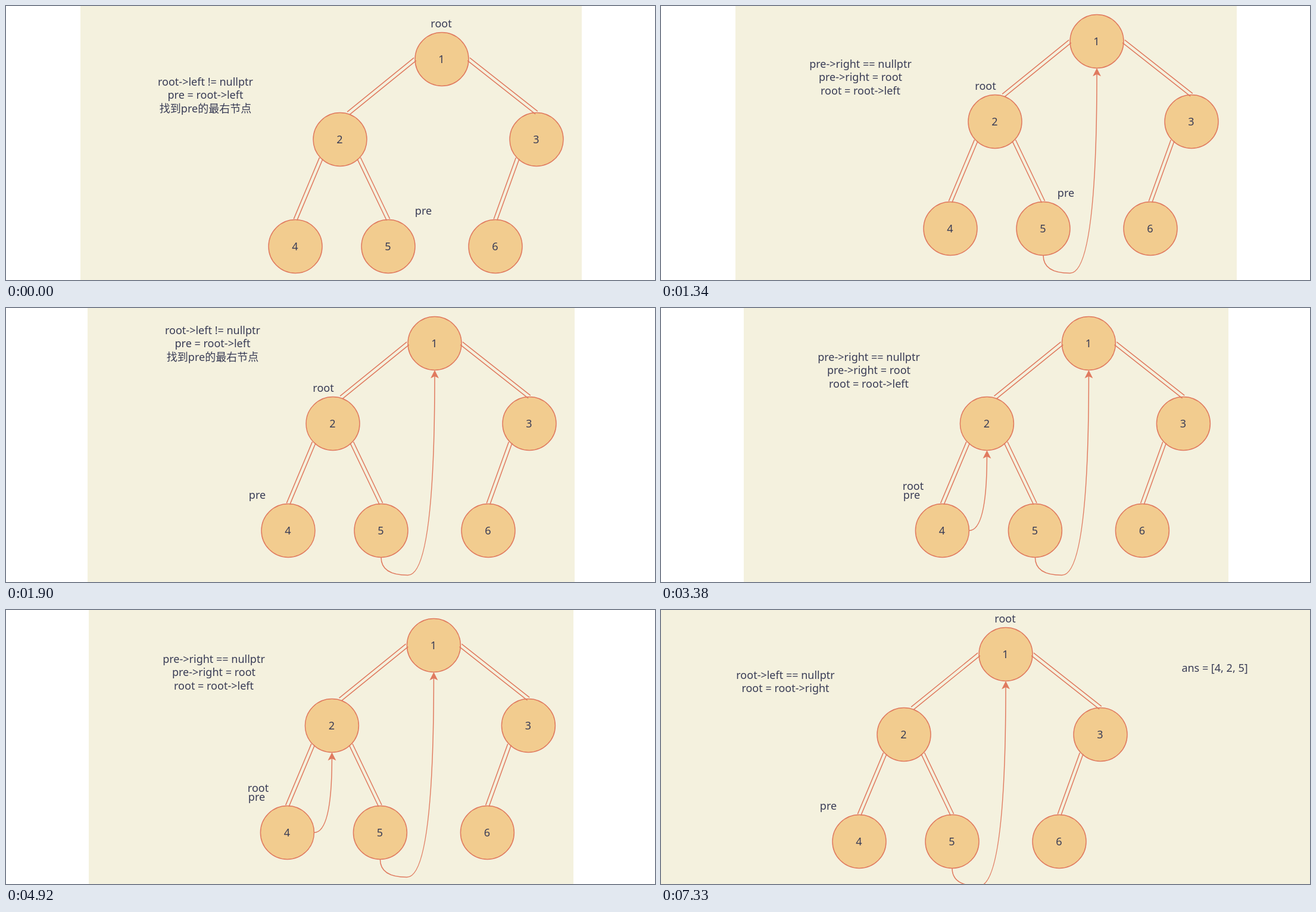
An HTML page that plays this animation: 1090 px wide and 461 px high, repeating every 8000 ms.

```html
<!DOCTYPE html>
<html lang="zh-CN">
<head>
<meta charset="utf-8">
<title>Threaded tree traversal</title>
<style>
  html, body { margin: 0; width: 100%; height: 100%; overflow: hidden; background: #fff; }
  svg { display: block; }
  .line { fill: none; stroke: #e07a5f; stroke-width: 1.5; }
  .node { fill: #f2cc8f; stroke: #e07a5f; stroke-width: 1.5; }
  .head { fill: #e07a5f; stroke: #e07a5f; stroke-width: 1.5; }
  text {
    font: 18px "Comic Sans MS", "Noto Sans", "Noto Sans CJK SC", sans-serif;
    fill: #393c56; text-anchor: middle;
  }
</style>
</head>
<body>
<svg id="stage" width="1090" height="461" viewBox="0 0 1090 461"></svg>
<script>
const LOOP = 8000, RADIUS = 45, LINE_HEIGHT = 22.5;

const nodes = [[732, 59.5], [561, 194.5], [891, 194.5], [486, 374.5], [642, 374.5], [822, 374.5]];
const edges = [
  [687, 59.5, 575, 150.5], [777, 59.5, 891, 149.5],
  [529.2, 226.3, 486, 329.5], [592.8, 226.3, 642, 329.5], [859.2, 226.3, 822, 329.5]
];

const seekRightmost = ["root->left != nullptr", "pre = root->left", "找到pre的最右节点"];
const addThread = ["pre->right == nullptr", "pre->right = root", "root = root->left"];

// dx, dy move the tree; labels and notes are placed on the stage.
const scenes = [
  { start: 0, paper: [125, 842], dx: 0, dy: 30, threads: 0,
    root: [731, 30], pre: [701, 345], note: [335, 127.5, seekRightmost] },
  { start: 500, paper: [125, 842], dx: 0, dy: 0, threads: 1,
    root: [545, 135], pre: [680, 315], note: [335, 97.5, addThread] },
  { start: 1900, paper: [137, 818], dx: -12, dy: 0, threads: 1,
    root: [533, 135], pre: [422, 315], note: [347, 37.5, seekRightmost] },
  { start: 3380, paper: [139, 814], dx: -13.6, dy: 0, threads: 2,
    root: [423.5, 300], pre: [421, 315], note: [349, 82.5, addThread] },
  { start: 5940, paper: [0, 1090], dx: -153, dy: 0, threads: 2,
    root: [386, 135], pre: [281, 315],
    note: [209, 94.5, ["root->left == nullptr", "root = root->left"]], answer: [82.5, "ans = [4]"] },
  { start: 7330, paper: [0, 1090], dx: -153, dy: 15, threads: 1,
    root: [578, 15], pre: [281, 330],
    note: [209, 109.5, ["root->left == nullptr", "root = root->right"]], answer: [97.5, "ans = [4, 2, 5]"] }
];

const label = (x, y, words) => `<text x="${x}" y="${y + 6}">${words}</text>`;

const circle = ([x, y], i) =>
  `<circle class="node" cx="${x}" cy="${y}" r="${RADIUS}"/>` + label(x - 0.5, y, i + 1);

function doubleLine([x1, y1, x2, y2]) {
  const length = Math.hypot(x2 - x1, y2 - y1);
  const nx = (y1 - y2) / length * 3, ny = (x2 - x1) / length * 3;
  const side = s => `M${x1 + s * nx} ${y1 + s * ny}L${x2 + s * nx} ${y2 + s * ny}`;
  return `<path class="line" d="${side(1)}${side(-1)}"/>`;
}

// A curve that rises into the bottom of a node and ends in an arrowhead.
function thread(curve, [x, y]) {
  const tip = y + RADIUS + 1.7;
  return `<path class="line" d="${curve} ${x} ${tip + 8}"/>` +
    `<path class="head" d="M${x} ${tip}l5.25 10.5l-5.25 -2.6l-5.25 2.6z"/>`;
}

const tree = nodes.map(circle).join("") + edges.map(doubleLine).join("");
const threads = [
  thread("M642 419.5Q642 449.5 687 449.5Q732 449.5", nodes[0]),
  thread("M531 374.5Q561 374.5", nodes[1])
];

function draw({ paper: [left, width], dx, dy, threads: count, root, pre, note: [x, y, lines], answer }) {
  return `<rect x="${left}" width="${width}" height="461" fill="#f4f1de"/>` +
    `<g transform="translate(${dx} ${dy})">${tree}${threads.slice(0, count).join("")}</g>` +
    label(...root, "root") + label(...pre, "pre") +
    lines.map((words, i) => label(x, y + i * LINE_HEIGHT, words)).join("") +
    (answer ? label(930, ...answer) : "");
}

const stage = document.getElementById("stage");
let shown;

function tick() {
  const time = performance.now() % LOOP;
  const scene = scenes.findLast(s => s.start <= time);
  if (scene !== shown) {
    stage.innerHTML = draw(scene);
    shown = scene;
  }
  requestAnimationFrame(tick);
}
tick();
</script>
</body>
</html>
```
